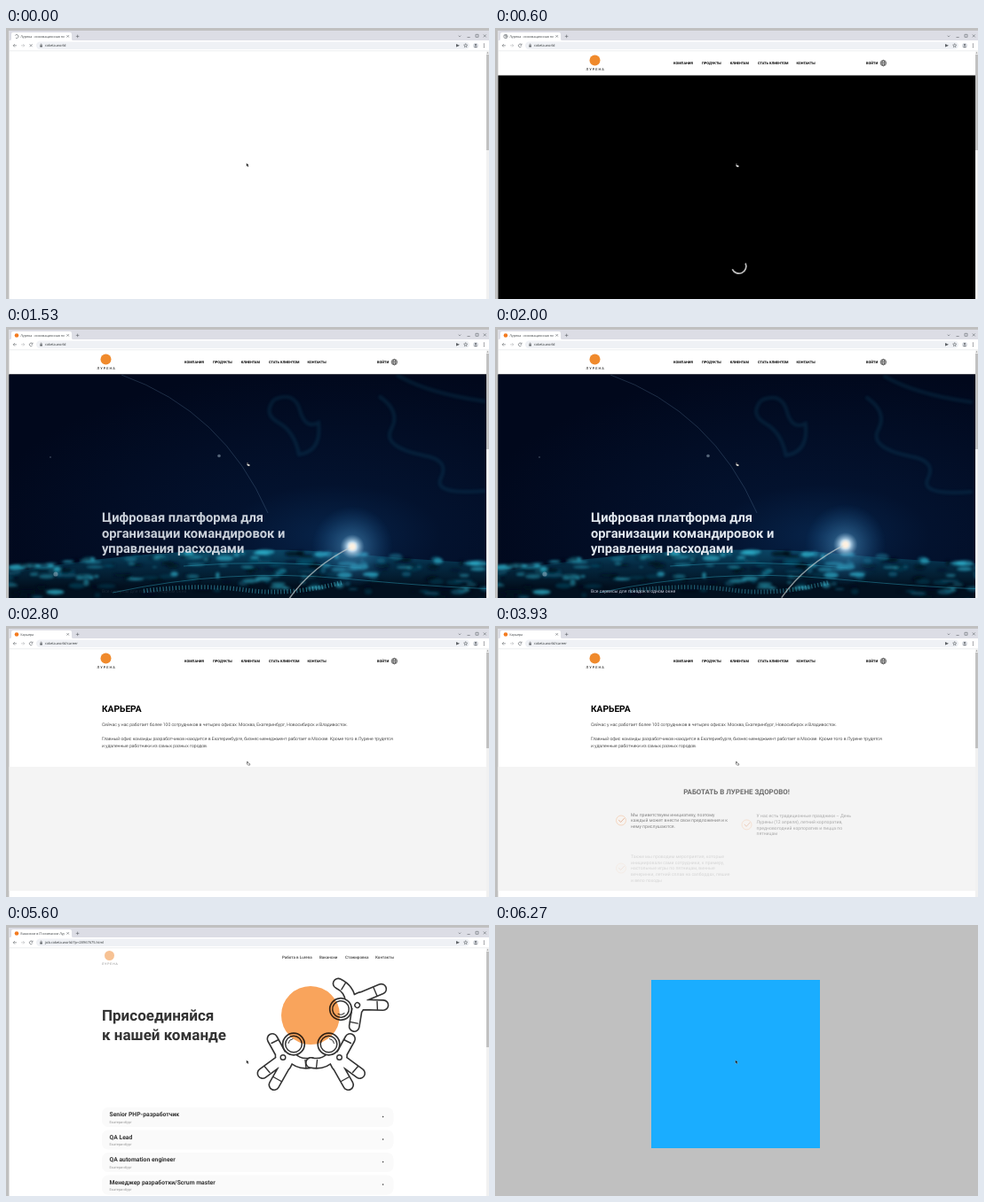
An HTML page that plays this animation: 544 px wide and 306 px high, repeating every 6.39 s.

```html
<!DOCTYPE html>
<html lang="ru">
<head>
<meta charset="utf-8">
<title>Браузер</title>
<style>
  html, body { margin: 0; height: 100%; overflow: hidden; background: #c0c0c0; }
  svg { display: block; width: 100vw; height: 100vh; font-family: Roboto, sans-serif; text-rendering: geometricPrecision; }
  .ui { font: 3.6px "Noto Sans", sans-serif; fill: #3c4043; }
  .line { fill: none; stroke: #5f6368; stroke-width: .6; }
  .nav { font-size: 3.93px; font-weight: 700; }
  .text { font-size: 5.1px; fill: #111; }
  .light { font-weight: 300; fill: #000; }
  .hero { font-size: 14.68px; font-weight: 700; fill: #e2e8ef; }
  .menu { font-size: 4.53px; font-weight: 500; fill: #444; }
  .join { font-size: 17px; font-weight: 700; fill: #333; }
  .job { font-size: 6.8px; font-weight: 600; fill: #333; }
  .city { font-size: 3.97px; fill: #999; }
</style>
</head>
<body>
<svg viewBox="0 0 544 306" preserveAspectRatio="none">
  <defs>
    <radialGradient id="night" cx=".68" cy=".72" r=".75">
      <stop stop-color="#07244a"/><stop offset=".3" stop-color="#03122e"/><stop offset="1" stop-color="#01081c"/>
    </radialGradient>
    <radialGradient id="glow">
      <stop stop-color="#fff"/><stop offset=".12" stop-color="#b5d3e8"/>
      <stop offset=".3" stop-color="#3f7fae" stop-opacity=".5"/><stop offset="1" stop-color="#1b5c94" stop-opacity="0"/>
    </radialGradient>
    <linearGradient id="sea" x2="0" y2="1">
      <stop stop-color="#0f6684" stop-opacity=".55"/><stop offset=".25" stop-color="#053048" stop-opacity=".8"/>
      <stop offset=".6" stop-color="#02101f"/>
    </linearGradient>
    <filter id="soft"><feGaussianBlur stdDeviation="1.5"/></filter>
    <clipPath id="screen"><path d="M3.5 53.4H541V306H3.5z"/></clipPath>
    <path id="limbs" d="M-13 14L-24-6M-3 14Q6 24 20 21M-16 19L-35 33M-9 23L-22 46M-15 13L-13 23M-9 14L-11 24M-4 14L-9 24"/>
    <g id="astronaut" fill="none" stroke="#333" stroke-linecap="round" stroke-linejoin="round">
      <use href="#limbs" stroke-width="13"/>
      <use href="#limbs" stroke="#fff" stroke-width="9.8"/>
      <path stroke-width="1.4" d="M-33 25L-27 32M-23 37L-14 42M-25-1L-17-5M13 18L14 27"/>
      <circle cx="-12" cy="15" r="2.8" stroke-width="1.4"/>
      <circle r="12.3" fill="#fff" stroke-width="1.7"/>
      <circle r="9.3" stroke-width="1.5"/>
      <path stroke-width="1" d="M-6-1A6 6 0 0 1-1-6"/>
    </g>
  </defs>

  <rect width="544" height="306" fill="#c0c0c0"/>
  <rect id="desktop" x="176" y="62" width="190" height="190" fill="#1aadff"/>

  <g id="window">
    <path fill="#fff" d="M3.5 3H544V306H3.5z"/>
    <path fill="#dcdde5" d="M3.5 3H544V14H3.5z"/>
    <path fill="#fff" d="M5 14Q6 14 6 12V7Q6 5 8 5H72Q74 5 74 7V12Q74 14 75 14z"/>
    <rect x="34" y="15.5" width="488" height="8.5" rx="4.2" fill="#eff1f5"/>
    <path stroke="#dadce0" stroke-width=".5" d="M3.5 25.8H544"/>
    <path class="line" d="M68.5 8.2l2.4 2.4m0-2.4l-2.4 2.4M78.8 9.4h3.6m-1.8-1.8v3.6M12 19.8H8.2m1.7-1.7l-1.7 1.7 1.7 1.7M509.7 8.6l1.3 1.3 1.3-1.3M519.5 10.5h3.2M529 7.3h3v3h-3zM537.8 7.4l3 3m0-3l-3 3"/>
    <path class="line" opacity=".45" d="M17 19.8h3.8m-1.7-1.7l1.7 1.7-1.7 1.7"/>
    <path id="stop" class="line" d="M26.6 18.2l3 3m0-3l-3 3"/>
    <path id="reload" class="line" d="M29.7 19a1.8 1.8 0 1 0 .1 1.5M30 17.6v1.6h-1.6"/>
    <path fill="#5f6368" d="M38.3 19.4h2.6v2h-2.6zM507 18l4 1.8-4 1.8zM537.9 17.6h1v1h-1zm0 1.7h1v1h-1zm0 1.7h1v1h-1z"/>
    <path class="line" d="M38.9 19.4v-.6a.7.7 0 0 1 1.4 0v.6M517.7 17.6l.6 1.5 1.5.1-1.2 1 .4 1.5-1.3-.8-1.3.8.4-1.5-1.2-1 1.5-.1z"/>
    <circle cx="529" cy="19.8" r="2.9" fill="#d5d8de"/><path fill="#5f6368" d="M527 21.7q2-2 4 0zM528 18.9a1 1 0 1 0 2 0 1 1 0 1 0-2 0"/>
    <path fill="#f1f1f1" d="M541 26H544V306h-3z"/>
    <path fill="#c1c1c1" d="M541 30H544V138h-3z"/><path fill="#777" d="M541.5 28.6l1-1.4 1 1.4z"/>
    <circle id="favicon" cx="12" cy="9.5" r="2.3" fill="#f47b20"/>
    <path id="globe" class="line" d="M9.8 9.5a2.2 2.2 0 1 0 4.4 0 2.2 2.2 0 1 0-4.4 0M10.5 8.3q2.5.2 1.8 3M12.5 7.6q-1 1.7 1.5 2.1"/>
    <path id="tabSpin" class="line" d="M0-2A2 2 0 1 1-2 0"/>
    <svg x="16.3" y="5" width="49.5" height="9"><text id="tab" class="ui" y="6"/></svg>
    <text id="url" class="ui" x="44" y="21.2" style="font-size:3.97px"/>

    <g id="header">
      <circle cx="112.5" cy="36.5" r="6" fill="#f08a2c"/>
      <text x="102.6" y="48" font-size="3.9" letter-spacing="1">ЛУРЕНА</text>
      <g id="nav" class="nav"></g>
      <g fill="none" stroke="#222" stroke-width=".55"><circle cx="437.4" cy="39.6" r="3.2"/><ellipse cx="437.4" cy="39.6" rx="1.4" ry="3.2"/><path d="M434.2 39.6h6.4M434.7 38h5.4m-5.4 3.2h5.4"/></g>
    </g>

    <g id="home" clip-path="url(#screen)">
      <path d="M3 53H541V306H3z"/>
      <g id="video">
        <path fill="url(#night)" d="M3 53H541V306H3z"/>
        <g id="clouds" fill="none" stroke="#1c7d9c" stroke-width="4" opacity=".17" filter="url(#soft)">
          <path d="M302 82Q325 72 331 94T352 108Q356 140 330 144Q325 118 307 108T302 82M420 78Q445 95 434 115T470 145Q500 150 490 170T540 185M440 54Q475 75 540 84"/>
        </g>
        <path fill="none" stroke="#6b8fae" stroke-width=".8" opacity=".35" d="M130 54Q245 95 295 210"/>
        <g id="waves">
          <path fill="url(#sea)" d="M-20 282Q90 260 200 254T390 256T570 268V320H-20z"/>
          <g id="foam" filter="url(#soft)"></g>
          <path fill="none" stroke="#4cc3db" stroke-width="5" stroke-dasharray="1 2.6" opacity=".55" d="M155 298Q220 290 270 297T380 288"/>
          <path fill="none" stroke="#2fa5be" stroke-width="1" opacity=".45" d="M200 270Q300 262 400 272M120 300Q250 272 380 284T570 296"/>
        </g>
        <g id="spark">
          <circle cx="390" cy="248" r="46" fill="url(#glow)"/>
          <path fill="none" stroke="#c7cfcf" stroke-width="1.4" opacity=".7" d="M390 248Q345 270 318 308"/>
          <circle cx="390" cy="248" r="4" fill="#fff1df" filter="url(#soft)"/>
        </g>
        <g fill="#a5b9c9" opacity=".5"><circle cx="240" cy="145.5" r="1.8"/><circle cx="56" cy="279" r="2.6"/><circle cx="50" cy="147" r=".8"/></g>
      </g>
      <path id="spinner" fill="none" stroke="#bbb" stroke-width="1.7" d="M7.4-3.4A8.1 8.1 0 0 1-7.4 3.4"/>
      <g id="slogan" class="hero"></g>
      <text id="lead" class="text" x="108" y="300" style="fill:#dde">Все сервисы для поездок в одном окне</text>
    </g>

    <g id="career">
      <text x="108" y="97" font-size="10.2" font-weight="700">КАРЬЕРА</text>
      <g id="about" class="text light"></g>
      <path fill="#f4f4f4" d="M3.5 159H541V299H3.5z"/>
      <text id="why" x="272" y="185.2" font-size="7.93" font-weight="700" text-anchor="middle">РАБОТАТЬ В ЛУРЕНЕ ЗДОРОВО!</text>
      <g id="perks"></g>
    </g>

    <g id="jobs">
      <g id="smallLogo"><circle cx="116.5" cy="34.5" r="5.5" fill="#f3a25c"/><text x="108" y="45.2" font-size="3.4" letter-spacing=".9" fill="#444">ЛУРЕНА</text></g>
      <g id="menu" class="menu"></g>
      <g id="join" class="join"></g>
      <use href="#astronaut" transform="translate(324 134.5)"/>
      <use href="#astronaut" transform="translate(363.5 134.5) scale(-1 1)"/>
      <use href="#astronaut" transform="translate(377 95) rotate(-142)"/>
      <circle cx="343" cy="102" r="33" fill="#f9a45c" style="mix-blend-mode:multiply"/>
      <g id="cards"></g>
    </g>
  </g>

  <path id="arrow" stroke="#fff" stroke-width=".25" d="M270.8 152.6v3.8l.9-.8.7 1.3.7-.3-.6-1.3h1.2z"/>
  <path id="hand" fill="#fff" stroke="#222" stroke-width=".5" d="M271.4 153.2h1v1.6l2 .5q.6.4.2 1.8h-2l-1.6-1.8.5-.2z"/>
</svg>
<script>
const $ = id => document.getElementById(id);
const lines = (x, y, step, rows) => rows.map((row, i) => `<text x="${x}" y="${y + i * step}">${row}</text>`).join('');
const row = (y, items) => items.map(([x, word]) => `<text x="${x}" y="${y}">${word}</text>`).join('');

$('nav').innerHTML = row(41, [[201, 'КОМПАНИЯ'], [233, 'ПРОДУКТЫ'], [264.7, 'КЛИЕНТАМ'], [296, 'СТАТЬ КЛИЕНТОМ'], [339.5, 'КОНТАКТЫ'], [418, 'ВОЙТИ']]);
$('slogan').innerHTML = lines(108, 220, 17.68, ['Цифровая платформа для', 'организации командировок и', 'управления расходами']);
$('about').innerHTML = lines(108, 112.8, 0, ['Сейчас у нас работает более 100 сотрудников в четырех офисах: Москва, Екатеринбург, Новосибирск и Владивосток.']) +
  lines(108, 128.9, 7.9, ['Главный офис команды разработчиков находится в Екатеринбурге, бизнес-менеджмент работает в Москве. Кроме того в Лурене трудятся', 'и удаленные работники из самых разных городов.']);

// Glowing and dark patches scattered below the horizon of the video
let seed = 7;
const random = () => (seed = seed * 16807 % 2147483647) / 2147483647;
$('foam').innerHTML = Array.from({ length: 230 }, () => {
  const x = random() * 580 - 20, depth = random() ** 1.6;
  const y = 254 + ((x - 290) / 75) ** 2 * 1.2 + depth * 45;
  const color = random() < .55 - depth * .25 ? '#2fb4cf' : random() < .4 ? '#0c5a75' : '#010c1a';
  return `<ellipse cx="${x}" cy="${y}" rx="${2 + random() * 9}" ry="${1 + random() * 2.5}" fill="${color}" opacity="${.3 + random() * .5}"/>`;
}).join('');

const perks = [
  [142, 214, 209, ['Мы приветствуем инициативу, поэтому', 'каждый может внести свои предложения и к', 'нему прислушаются.']],
  [283.5, 217, 209, ['У нас есть традиционные праздники – День', 'Лурены (12 апреля), летний корпоратив,', 'предновогодний корпоратив и пицца по', 'пятницам']],
  [142, 264, 252.3, ['Также мы проводим мероприятия, которые', 'инициировали сами сотрудники, к примеру,', 'настольные игры по пятницам, винные', 'вечеринки, летний сплав на сапбордах, пешие', 'и вело походы']],
  [283.5, 257.5, 252.5, ['Ещё мы совместно участвуем в экологических', 'проектах, занимаемся йогой и', 'совершенствуем английский язык']],
];
$('perks').innerHTML = perks.map(([x, cy, y, rows]) => `<g class="text">
  <circle cx="${x}" cy="${cy}" r="5.5" fill="#fbf3ec" stroke="#f0a066" stroke-width=".7"/>
  <path d="M${x - 2.7} ${cy - .6}l2.3 2.6 4.2-4.6" fill="none" stroke="#c9622a" stroke-width=".8"/>
  ${lines(x + 11, y, 6.7, rows)}</g>`).join('');

$('menu').innerHTML = row(38.4, [[311, 'Работа в Lurena'], [353, 'Вакансии'], [382, 'Стажировка'], [416, 'Контакты']]);
$('join').innerHTML = lines(108, 108, 22.3, ['Присоединяйся', 'к нашей команде']);
$('cards').innerHTML = ['Senior PHP-разработчик', 'QA Lead', 'QA automation engineer', 'Менеджер разработки/Scrum master'].map((name, i) => `
  <g transform="translate(0 ${i * 25.5})"><rect x="108" y="206" width="328.5" height="22" rx="7" fill="#fafafa"/>
  <text class="job" x="116.5" y="216">${name}</text><text class="city" x="116.5" y="223.6">Екатеринбург</text>
  <path d="M424 215.6l1.6 1-1.6 1z" fill="#333"/></g>`).join('');

const LOOP = 6390;
const ramp = (t, from, length) => Math.min(1, Math.max(0, (t - from) / length));
const easeOut = p => 1 - (1 - p) ** 2;
const within = (t, from, to) => t >= from && t < to;
const show = (id, on) => $(id).style.display = on ? '' : 'none';
const fade = (el, p, rise = 0) => {
  el.setAttribute('opacity', p);
  el.setAttribute('transform', `translate(0 ${rise * (1 - p)})`);
};
const latest = (t, steps) => steps.filter(([start]) => t >= start).pop()[1];

const titles = [[0, 'Лурена - инновационная платформа'], [2400, 'Карьера'], [4870, 'job.raketa.world'], [5200, 'Вакансии в IT-компании Лурена']];
const urls = [[0, 'raketa.world'], [2330, 'raketa.world/career'], [4870, 'job.raketa.world/?p=28967675.html']];

function draw(t) {
  const closed = t >= 6270;
  show('window', !closed);
  show('desktop', closed);

  const loading = t < 540 || within(t, 2070, 2600) || within(t, 4740, 5530);
  show('stop', loading);
  show('reload', !loading);
  show('tabSpin', loading);
  show('globe', within(t, 540, 930));
  show('favicon', !loading && t >= 930);
  $('tabSpin').setAttribute('transform', `translate(12 9.5) rotate(${t * .4 - 60})`);
  $('tab').textContent = latest(t, titles);
  $('url').textContent = latest(t, urls);

  const home = within(t, 400, 2400), career = within(t, 2400, 4870);
  show('header', home || career);
  show('home', home);
  show('career', career);
  show('jobs', t >= 5530);
  show('hand', home || career);
  show('arrow', !home && !career);

  const drift = (t - 1530) / 1000;
  $('video').setAttribute('opacity', ramp(t, 730, 330));
  $('clouds').setAttribute('transform', `translate(${-5 * drift} ${2 * drift})`);
  $('waves').setAttribute('transform', `translate(${-6 * drift} 0)`);
  $('spark').setAttribute('transform', `translate(${10 * drift} ${-5 * drift})`);
  show('spinner', t < 800);
  $('spinner').setAttribute('transform', `translate(274.7 269) rotate(${(t - 600) * .36})`);
  fade($('slogan'), easeOut(ramp(t, 1060, 700)));
  fade($('lead'), ramp(t, 1470, 500) * .9);

  fade($('why'), easeOut(ramp(t, 3780, 450)), 10);
  [...$('perks').children].forEach((perk, i) => fade(perk, easeOut(ramp(t, 3800 + i * 50, 450)), 11));
  $('smallLogo').setAttribute('opacity', .65 + .35 * ramp(t, 5600, 130));
}

function tick(now) {
  draw(now % LOOP);
  requestAnimationFrame(tick);
}
requestAnimationFrame(tick);
</script>
</body>
</html>
```
